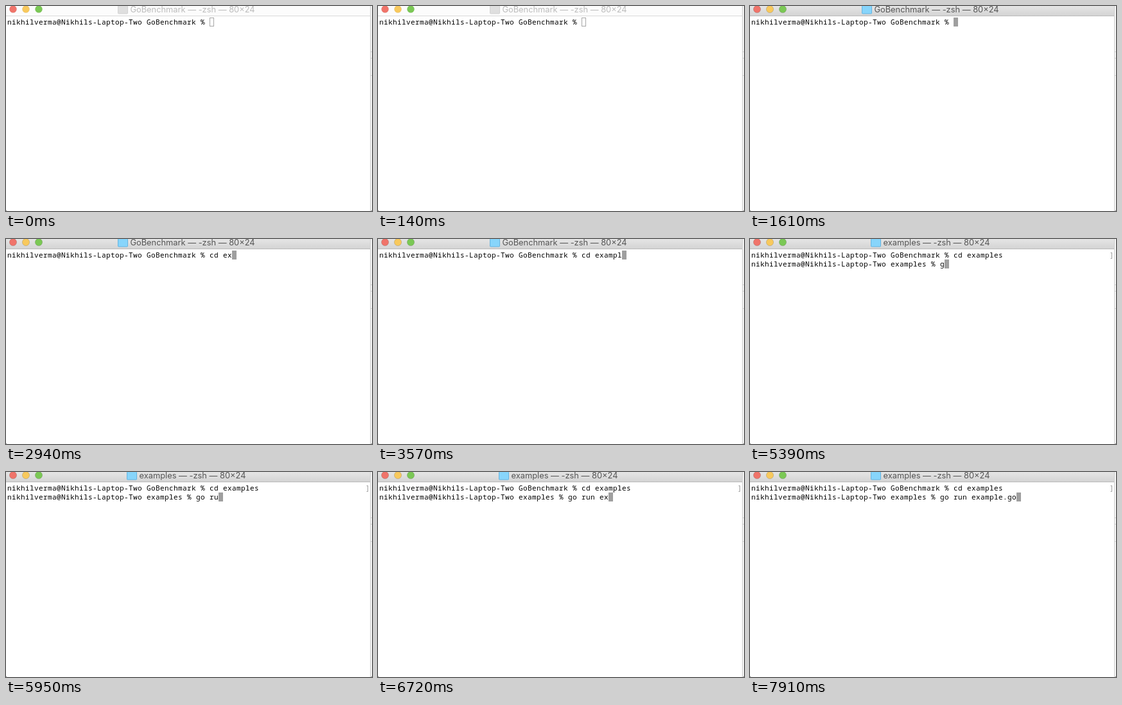
Animation, 570 px wide and 320 px high, one loop 8000 ms. Source, as an HTML page:

```html
<!DOCTYPE html>
<html lang="en">
<head>
<meta charset="utf-8">
<title>Terminal</title>
<style>
  html, body { margin: 0; width: 100%; height: 100%; overflow: hidden; background: #fff; }
  svg { display: block; width: 570px; height: 320px; }
  .mono { font: 11px "Noto Sans Mono", "DejaVu Sans Mono", monospace; white-space: pre; fill: #000; }
  .mark { fill: #9a9a9a; }
  #title { font: 12.85px Inter, "Liberation Sans", sans-serif; text-anchor: middle; fill: #555; }
  #bar { fill: url(#active); }
  #rule { fill: #b9b9b9; }
  #folder { fill: #87d5fb; stroke: #66b4e0; }
  .light { stroke: #000; stroke-opacity: .14; }
  #red { fill: #f0746a; }
  #amber { fill: #f8c95d; }
  #green { fill: #7bc855; }
  #cursor { fill: #9f9f9f; }
  .idle #bar { fill: #fcfcfc; }
  .idle #rule { fill: #d9d9d9; }
  .idle #title { fill: #bcbcbc; }
  .idle #folder { fill: #dfdfdf; stroke: #d3d3d3; }
  .idle .light { fill: #dfdfdf; stroke-opacity: .05; }
  .idle #cursor { fill: #fff; stroke: #a6a6a6; }
</style>
</head>
<body>
<svg id="stage" class="idle" viewBox="0 0 570 320">
  <defs>
    <linearGradient id="active" x1="0" y1="0" x2="0" y2="1">
      <stop offset="0" stop-color="#e5e5e5"/>
      <stop offset="1" stop-color="#d4d4d4"/>
    </linearGradient>
  </defs>
  <rect width="570" height="320" fill="#fff"/>
  <rect id="bar" width="567" height="15"/>
  <rect id="rule" y="15" width="567" height="1"/>
  <g id="lights">
    <circle id="red" class="light" cx="11" cy="5" r="5.6"/>
    <circle id="amber" class="light" cx="31" cy="5" r="5.6"/>
    <circle id="green" class="light" cx="51" cy="5" r="5.6"/>
  </g>
  <rect id="folder" x=".5" y="-.5" width="15" height="12.5" rx="1"/>
  <text id="title" x="290.5" y="10.3"></text>

  <!-- window edge and what shows beside it -->
  <rect x="568" width="2" height="320" fill="#f5f5f5"/>
  <rect x="567" width="1" height="320" fill="#cfcfcf"/>
  <path d="M568 71.5h2M568 81.5h2M568 108.5h2" stroke="#d2d2d2"/>
  <path d="M0 318.5V320H1.5ZM570 318.5V320H568.5Z" fill="#777"/>

  <rect id="cursor"/>
  <text id="row0" class="mono" y="29"></text>
  <text id="row1" class="mono" y="43"></text>
  <g id="marks">
    <text class="mono mark" x="-5" y="29">[</text>
    <text class="mono mark" x="560" y="29">]</text>
  </g>
</svg>
<script>
  const LOOP = 8000, FOCUS = 1610, ENTER = 3990;
  const CELL = 7, LINE = 14, LEFT = 2, TOP = 18;
  const HOST = "nikhilverma@Nikhils-Laptop-Two";

  // one keystroke time per character
  const lines = [
    { dir: "GoBenchmark", cmd: "cd examples",
      keys: [2310, 2450, 2590, 2800, 2940, 3080, 3150, 3430, 3570, 3710, 3850] },
    { dir: "examples", cmd: "go run example.go",
      keys: [5390, 5460, 5600, 5810, 5950, 6090, 6300, 6580, 6720,
             6860, 7000, 7140, 7280, 7420, 7560, 7770, 7910] }
  ];

  const el = id => document.getElementById(id);
  const set = (node, attrs) => {
    for (const key in attrs) node.setAttribute(key, attrs[key]);
  };

  function lineAt(i, t) {
    const { dir, cmd, keys } = lines[i];
    return `${HOST} ${dir} % ` + cmd.slice(0, keys.filter(k => k <= t).length);
  }

  function write(i, text) {
    const row = el("row" + i);
    row.textContent = text;
    set(row, { x: Array.from(text, (_, n) => LEFT + n * CELL).join(" ") });
  }

  function draw(t) {
    const idle = t < FOCUS;
    const current = t < ENTER ? 0 : 1;
    const text = lineAt(current, t);
    const inset = idle ? 0.5 : 0;

    write(0, lineAt(0, t));
    write(1, current ? text : "");
    set(el("cursor"), {
      x: LEFT + text.length * CELL + inset,
      y: TOP + current * LINE + inset,
      width: CELL - 2 * inset,
      height: LINE - 2 * inset
    });
    set(el("stage"), { class: idle ? "idle" : "" });
    set(el("folder"), { transform: `translate(${current ? 188 : 174})` });
    set(el("marks"), { visibility: current ? "visible" : "hidden" });
    el("title").textContent = `${lines[current].dir} — -zsh — 80×24`;
  }

  const start = performance.now();
  function tick() {
    draw((performance.now() - start) % LOOP);
    requestAnimationFrame(tick);
  }
  tick();
</script>
</body>
</html>
```
